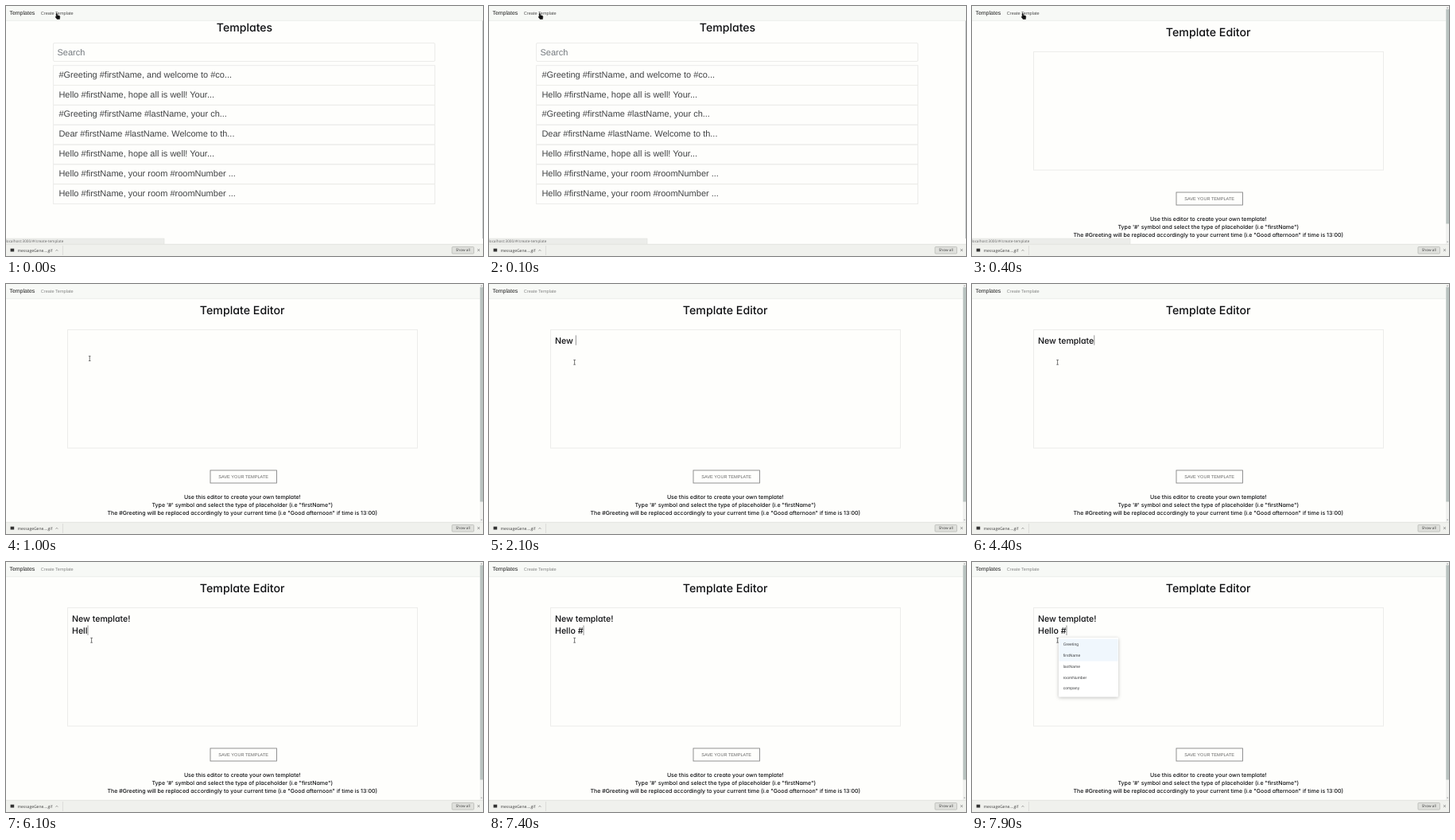
Animation, 600 px wide and 314 px high, one loop 8 s. Source, as an HTML page:

```html
<!DOCTYPE html>
<html lang="en">
<head>
<meta charset="utf-8">
<title>Template Editor</title>
<style>
  html, body { margin: 0; width: 100%; height: 100%; overflow: hidden; background: #fefefc; }
  svg { display: block; width: 600px; height: 314px; }
  text { font-family: "Liberation Sans", Arial, sans-serif; text-rendering: geometricPrecision; white-space: pre; fill: #404244; }
  .lex { font-family: Inter, sans-serif; font-feature-settings: "cv11"; font-weight: 450; fill: #0e0f12; }
  .ui { font-family: "Open Sans", "Noto Sans", sans-serif; fill: #3c3c3c; }
  .mid { text-anchor: middle; }
  .box { fill: none; stroke: #ececea; }
</style>
</head>
<body>
<svg viewBox="0 0 600 314">
  <rect width="600" height="314" fill="#fefefc"/>

  <g id="list">
    <text class="lex mid" x="300" y="32" font-size="14.1">Templates</text>
    <rect class="box" x="59.5" y="46.5" width="480" height="23" rx="1.5"/>
    <text x="64.5" y="62" font-size="11" style="fill:#74797e">Search</text>
    <g id="rows"></g>
    <path d="M599.6 0V292" stroke="#b4b8b8" stroke-width=".8"/>
  </g>

  <g id="editor">
    <text class="lex mid" x="297.2" y="37.5" font-size="14.2">Template Editor</text>
    <rect class="box" x="77.5" y="57.5" width="440" height="148.5"/>
    <rect x="257" y="234" width="83.5" height="16" fill="none" stroke="#777" stroke-width=".8"/>
    <text class="mid" x="298.7" y="244" font-size="5.6" style="fill:#666">SAVE YOUR TEMPLATE</text>
    <g class="mid" font-size="7.03">
      <text class="lex" x="297.3" y="269.5">Use this editor to create your own template!</text>
      <text class="lex" x="297.3" y="279.7">Type '#' symbol and select the type of placeholder (i.e "firstName")</text>
      <text class="lex" x="297.3" y="290">The #Greeting will be replaced accordingly to your current time (i.e "Good afternoon" if time is 13:00)</text>
    </g>
    <text class="lex line" x="83" y="74.7" font-size="10.6"></text>
    <text class="lex line" x="83" y="90" font-size="10.6"></text>
    <rect id="caret" width=".7" height="12.4" fill="#666"/>
  </g>

  <rect width="600" height="18" fill="#f7f9f6"/>
  <path d="M0 18.4H600" stroke="#e9ebe8" stroke-width=".8"/>
  <text x="4.4" y="11" font-size="7" style="fill:#222">Templates</text>
  <text id="link" x="43.8" y="11" font-size="5.6">Create Template</text>

  <g id="bar">
    <rect x="596" width="4" height="299" fill="#f1f2f0"/>
    <rect x="596.3" y="4" width="3.7" height="269.5" fill="#b9c3c0"/>
    <path d="M597 2.7l1.1-1.2 1.1 1.2zM597 295.8l1.1 1.2 1.1-1.2z" fill="#888"/>
  </g>

  <g id="status">
    <rect x="-1" y="292" width="200" height="8" fill="#ecedea" stroke="#e0e0dd" stroke-width=".6"/>
    <text class="ui" x="-.4" y="297.2" font-size="4.7" style="fill:#666">localhost:3000/#/create-template</text>
  </g>

  <rect y="299" width="600" height="15" fill="#f0f1ed"/>
  <path d="M0 299.3H600" stroke="#dddfda" stroke-width=".7"/>
  <path d="M71.5 301V313" stroke="#d4d5d1" stroke-width=".7"/>
  <rect x="5.6" y="304.7" width="4.6" height="3.8" fill="#333"/>
  <text class="ui" x="14.4" y="308.7" font-size="5">messageGene....gif</text>
  <path d="M62.6 307.6l1.3-1.3 1.3 1.3" fill="none" stroke="#666" stroke-width=".7"/>
  <rect x="561" y="302.5" width="27.5" height="8.6" rx="1" fill="#dfe0dc" stroke="#b4b5b1" stroke-width=".7"/>
  <text class="ui mid" x="574.8" y="308.4" font-size="4.7" font-weight="500">Show all</text>
  <path d="M593.2 305.3l2.6 2.6m0-2.6l-2.6 2.6" stroke="#666" stroke-width=".7"/>

  <g id="popup">
    <rect x="109" y="95" width="75" height="74.5" rx="1" fill="#fff" style="filter:drop-shadow(0 1px 2px rgba(0,0,0,.25))"/>
    <rect id="pick" x="109.4" y="96.6" width="74.2" fill="#f0f7fd"/>
  </g>

  <g id="pointer">
    <path id="hand" d="M-2 -3.5q.7-.8 1.2 0l.5 2.2 2.4.6q.9.4.7 1.6l-.4 2.7h-3.2l-2-2.7q-.1-1 1-.4z" fill="#111" stroke="#111" stroke-width=".5"/>
    <path id="arrow" d="M0 0V6.5l1.6-1.4 1.1 2.4 1-.5-1-2.3h2z" fill="#111" stroke="#fff" stroke-width=".4"/>
    <path id="beam" d="M-1.3 -2.9H1.3M0 -2.9V2.9M-1.3 2.9H1.3" stroke="#555" stroke-width=".8"/>
  </g>
</svg>
<script>
const LOOP = 8000;
const $ = id => document.getElementById(id);
const show = (id, on) => { $(id).style.display = on ? "" : "none"; };

const add = (parent, tag, attrs, label = "") => {
  const el = document.createElementNS("http://www.w3.org/2000/svg", tag);
  for (const key in attrs) el.setAttribute(key, attrs[key]);
  el.textContent = label;
  parent.append(el);
};

[
  "#Greeting #firstName, and welcome to #co...",
  "Hello #firstName, hope all is well! Your...",
  "#Greeting #firstName #lastName, your ch...",
  "Dear #firstName #lastName. Welcome to th...",
  "Hello #firstName, hope all is well! Your...",
  "Hello #firstName, your room #roomNumber ...",
  "Hello #firstName, your room #roomNumber ..."
].forEach((label, i) => {
  const y = 74.7 + i * 24.83;
  add($("rows"), "rect", { class: "box", x: 59.5, y, width: 480, height: 24.83 });
  add($("rows"), "text", { x: 66.4, y: y + 15.1, "font-size": 11 }, label);
});

["Greeting", "firstName", "lastName", "roomNumber", "company"].forEach((label, i) =>
  add($("popup"), "text", { x: 114.7, y: 105 + i * 13.85, "font-size": 5.05 }, label));

// [time, text in the editor]
const typing = [
  [0, ""], [1700, "N"], [2000, "New"], [2100, "New "], [2600, "New t"], [2700, "New te"],
  [3200, "New tem"], [3300, "New temp"], [3500, "New templ"], [3600, "New templa"],
  [4000, "New template"], [4100, "New template!"], [4400, "New template"],
  [4700, "New template!"], [5000, "New template!\n"], [5600, "New template!\nH"],
  [5900, "New template!\nHe"], [6000, "New template!\nHel"], [6100, "New template!\nHell"],
  [6700, "New template!\nHello"], [6900, "New template!\nHello "], [7400, "New template!\nHello #"]
];
const lines = [...document.querySelectorAll(".line")];

function drawText(t) {
  const rows = typing.findLast(step => step[0] <= t)[1].split("\n");
  lines.forEach((el, i) => {
    const value = (rows[i] || "").replace(/ /g, "\u00a0");
    if (el.textContent !== value) el.textContent = value;
  });
  const last = rows.length - 1;
  const width = rows[last] ? lines[last].getComputedTextLength() : 0;
  $("caret").setAttribute("x", 83.2 + width);
  $("caret").setAttribute("y", last ? 79.6 : 64.4);
  show("caret", t >= 1100 && !(t >= 1500 && t < 1700));
}

function drawPointer(t) {
  const k = Math.min(1, Math.max(0, (t - 400) / 700));
  const ease = k * k * (3 - 2 * k);
  const x = 65 + 42.6 * ease, y = 13 + 85.3 * ease;
  const hover = y < 18;
  $("pointer").setAttribute("transform", `translate(${x} ${y})`);
  show("hand", hover);
  show("arrow", !hover && y < 57);
  show("beam", y >= 57);
  show("status", hover);
  $("link").style.fill = hover ? "#505050" : "#868786";
}

function draw() {
  const t = Math.floor(performance.now() % LOOP / 100) * 100;
  const editing = t >= 400;
  show("list", !editing);
  show("editor", editing);
  show("bar", editing);
  show("popup", t >= 7500);
  $("pick").setAttribute("height", t < 7900 ? 14 : 28);
  drawPointer(t);
  drawText(t);
  requestAnimationFrame(draw);
}
draw();
</script>
</body>
</html>
```
